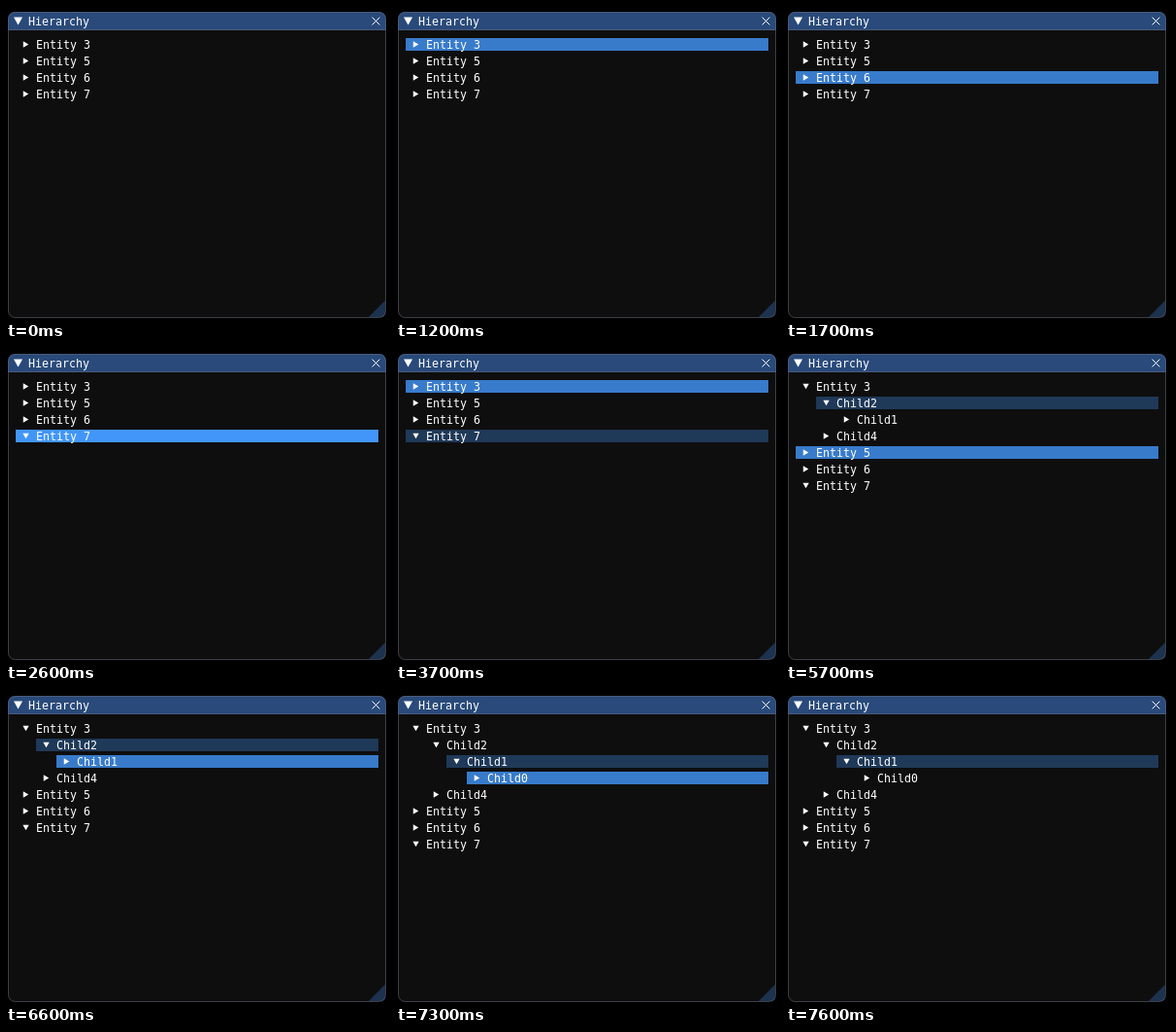
Animation of 396x323 px, one loop 8000 ms. Source, as an HTML page with a canvas:

```html
<!DOCTYPE html>
<html lang="en">
<head>
<meta charset="utf-8">
<title>Hierarchy</title>
<style>
  html, body { margin: 0; width: 396px; height: 323px; overflow: hidden; background: #000; }
  canvas { display: block; }
</style>
</head>
<body>
<canvas id="stage" width="396" height="323"></canvas>
<script>
const ctx = document.getElementById('stage').getContext('2d');
const LOOP = 8000, TOP = 33, PITCH = 17, ROW = 13, INDENT = 21;
const HOVER = '#387bcb', ACTIVE = '#4296fa', SELECTED = '#1f3958';

const tree = [
  { name: 'Entity 3', openAt: 4000, children: [
    { name: 'Child2', openAt: 5200, children: [
      { name: 'Child1', openAt: 7000, children: [{ name: 'Child0' }] }
    ] },
    { name: 'Child4' }
  ] },
  { name: 'Entity 5' },
  { name: 'Entity 6' },
  { name: 'Entity 7', openAt: 2600 }
];

// [time, name of the row under the pointer]
const pointer = [
  [0, ''], [500, 'Entity 7'], [800, 'Entity 6'], [1000, 'Entity 5'], [1200, 'Entity 3'],
  [1500, ''], [1600, 'Entity 5'], [1700, 'Entity 6'], [1800, 'Entity 7'],
  [2800, ''], [3400, 'Entity 6'], [3500, 'Entity 5'], [3600, ''], [3700, 'Entity 3'],
  [4500, ''], [4600, 'Child2'],
  [5500, 'Child1'], [5600, 'Child4'], [5700, 'Entity 5'], [5900, 'Child4'],
  [6200, ''], [6400, 'Child4'], [6600, 'Child1'],
  [7300, 'Child0'], [7400, 'Entity 5'], [7500, 'Entity 7'], [7600, '']
];

// Each click selects and opens a row, and holds the button for 100 ms
const clicks = [[2600, 'Entity 7'], [4000, 'Entity 3'], [5200, 'Child2'], [7000, 'Child1']];

const latest = (list, t) => list.filter(e => e[0] <= t).pop() || [-LOOP, ''];

function visibleRows(nodes, t, level = 0, out = []) {
  for (const node of nodes) {
    const open = t >= node.openAt;
    out.push({ name: node.name, level, open });
    if (open && node.children) visibleRows(node.children, t, level + 1, out);
  }
  return out;
}

function polygon(points, color) {
  ctx.fillStyle = color;
  ctx.beginPath();
  points.forEach(([x, y]) => ctx.lineTo(x, y));
  ctx.closePath();
  ctx.fill();
}

function arrow(x, y, r, down) {
  const a = r * 0.75, b = r * 0.866;
  polygon(down
    ? [[x, y + a], [x - b, y - a], [x + b, y - a]]
    : [[x + a, y], [x - a, y + b], [x - a, y - b]], '#fff');
}

function label(text, x, baseline) {
  ctx.fillStyle = '#fff';
  ctx.fillText(text, x, baseline);
}

function panel() {
  ctx.fillStyle = '#000';
  ctx.fillRect(0, 0, 396, 323);

  ctx.save();
  ctx.beginPath();
  ctx.roundRect(2, 6, 390, 315, 7);
  ctx.clip();
  ctx.fillStyle = '#0e0e0e';
  ctx.fillRect(2, 6, 390, 315);
  ctx.fillStyle = '#294a7a';
  ctx.fillRect(2, 6, 390, 19);
  polygon([[391, 303], [391, 320], [374, 320]], '#1c324e');
  ctx.restore();

  ctx.lineWidth = 1;
  ctx.strokeStyle = 'rgba(110,110,128,0.5)';
  ctx.beginPath();
  ctx.roundRect(2.5, 6.5, 389, 314, 7);
  ctx.moveTo(3, 24.5);
  ctx.lineTo(391, 24.5);
  ctx.stroke();

  arrow(12.5, 15.5, 5.2, true);
  label('Hierarchy', 23, 20);

  ctx.strokeStyle = '#fff';
  ctx.beginPath();
  for (const s of [-1, 1]) {
    ctx.moveTo(381.5 - 3.9, 15.5 - 3.9 * s);
    ctx.lineTo(381.5 + 3.9, 15.5 + 3.9 * s);
  }
  ctx.stroke();
}

function draw(t) {
  ctx.font = '11.63px "DejaVu Sans Mono", monospace';
  panel();
  const hovered = latest(pointer, t)[1];
  const [clickTime, selected] = latest(clicks, t);
  const held = t - clickTime < 100;

  visibleRows(tree, t).forEach(({ name, level, open }, i) => {
    const y = TOP + i * PITCH, x = 10 + level * INDENT;
    const fill = name === hovered ? (held ? ACTIVE : HOVER)
      : name === selected ? SELECTED : null;
    if (fill) {
      ctx.fillStyle = fill;
      ctx.fillRect(x, y, 384 - x, ROW);
    }
    arrow(x + 10.5, y + 6.5, 3.64, open);
    label(name, x + INDENT, y + 11);
  });
}

const start = performance.now();
function frame() {
  draw((performance.now() - start) % LOOP);
  requestAnimationFrame(frame);
}
frame();
</script>
</body>
</html>
```
